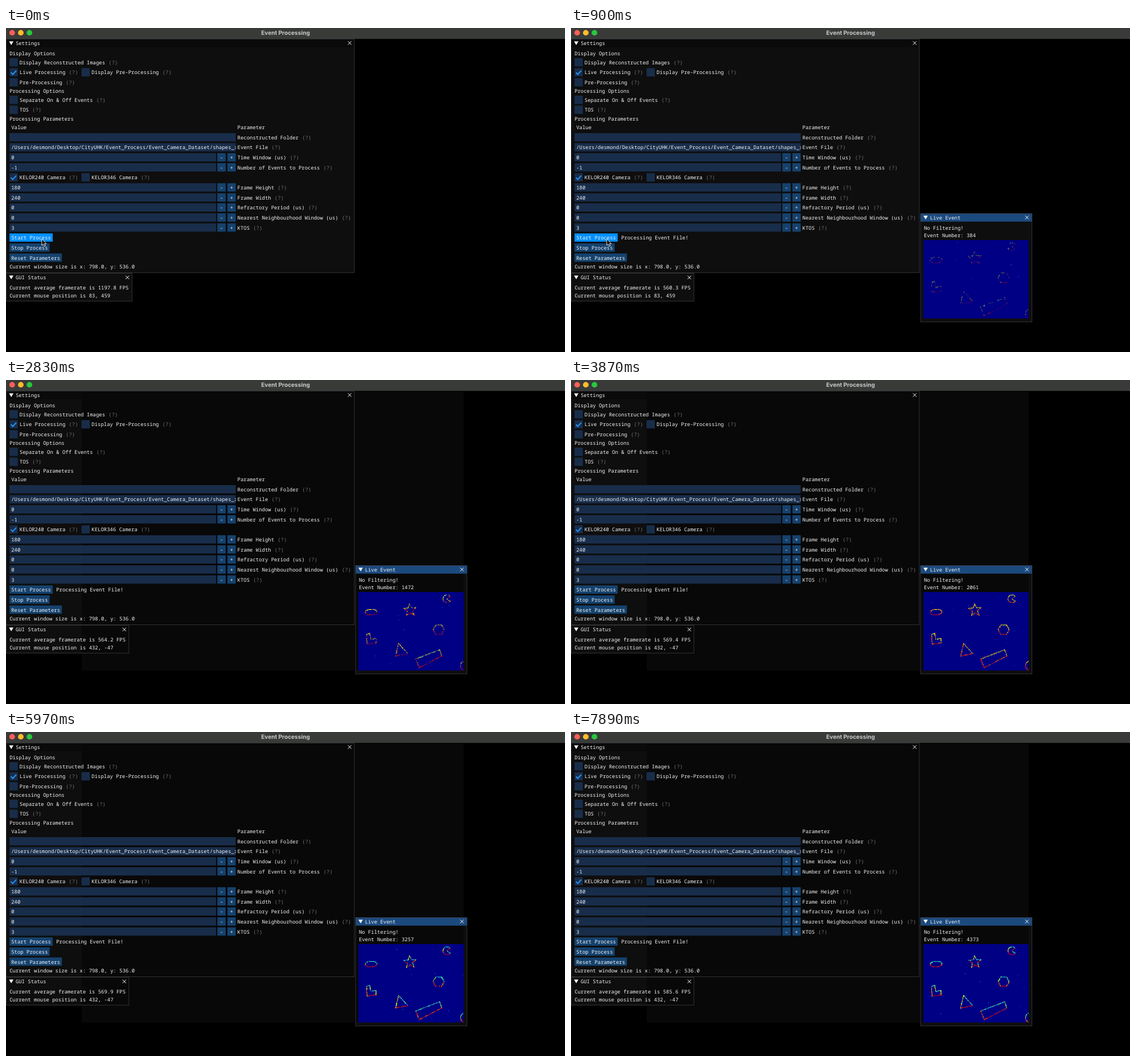
An HTML page with a canvas for the animation above (8000 ms loop, 982 px wide and 570 px high).

```html
<!DOCTYPE html>
<html lang="en">
<head>
<meta charset="utf-8">
<title>Event Processing</title>
<style>
  html, body { margin: 0; width: 100%; height: 100%; overflow: hidden; background: #000; }
  #stage { position: absolute; left: 0; top: 0; width: 982px; height: 570px; overflow: hidden; }
  svg { position: absolute; left: 0; top: 0; }
  text { white-space: pre; text-rendering: geometricPrecision; }
  #ui text { font: 11.667px "Noto Sans Mono", "DejaVu Sans Mono", monospace; fill: #f4f4f4; }
  #ui .dim { fill: #757575; }
  .caption { font: 700 10.1px Inter, sans-serif; fill: #c9cac9; text-anchor: middle; }
  .win { fill: #0e0e0e; }
  .edge { fill: none; stroke: #3e3e44; }
  .field { fill: #182d4a; }
  .btn { fill: #15426e; }
  .hot { fill: #0290ff; }
  .tick { fill: none; stroke: #1f97ff; stroke-width: 2.6; }
  .cross { stroke: #fff; stroke-width: 1.3; }
  canvas { position: absolute; left: 619.2px; top: 372.9px; width: 184.8px; height: 138.6px; }
</style>
</head>
<body>
<div id="stage">
  <svg id="scene" width="982" height="570" viewBox="0 0 982 570"></svg>
  <canvas id="view" width="240" height="180"></canvas>
  <svg width="982" height="570" viewBox="0 0 982 570">
    <path id="pointer" d="M0 0V11.2L2.6 8.8L4.5 12.8L6.3 12L4.5 8.1H8Z" fill="#000" stroke="#fff" stroke-width=".9"/>
  </svg>
</div>
<script>
const LOOP = 8000, SCALE = 0.76719, BAR = 25;
const $ = id => document.getElementById(id);

// ---- Interface, laid out in unscaled window pixels ----
const rect = (x, y, w, h, cls, id = '') =>
  `<rect x="${x}" y="${y}" width="${w}" height="${h}" class="${cls}" id="${id}"/>`;
const label = (x, mid, str, cls = '', id = '') =>
  `<text x="${x}" y="${mid + 4.7}" class="${cls}" id="${id}">${str.replace(/&/g, '&amp;')}</text>`;
const helped = (x, mid, str) =>
  label(x, mid, str) + label(x + str.length * 7 + 8, mid, '(?)', 'dim');
const button = (mid, str, id) =>
  rect(8, mid - 9.5, str.length * 7 + 8, 19, 'btn', id) + label(12, mid, str);
const checkbox = (x, mid, str, on, id) =>
  rect(x, mid - 9.5, 19, 19, 'field', id) +
  (on ? `<path class="tick" d="M${x + 3.5} ${mid + .5}l4 4.5l8-9"/>` : '') +
  helped(x + 23, mid, str);
const cross = (x, y) =>
  `<path class="cross" d="M${x - 4} ${y - 4}l8 8m0-8l-8 8"/>`;
const heading = (x, y, str) =>
  `<path d="M${x + 7} ${y + 5.5}h10l-5 8.5z" fill="#fff"/>` + label(x + 22, y + 10, str);
const field = (mid, name, value, steps) =>
  rect(8, mid - 9.5, steps ? 473 : 518, 19, 'field') +
  `<g clip-path="url(#fieldClip)">${label(12, mid, value)}</g>` +
  (steps ? [[484, '-'], [507, '+']].map(([x, s]) =>
    rect(x, mid - 9.5, 19, 19, 'btn') + label(x + 6, mid, s)).join('') : '') +
  helped(530, mid, name);

const path = '/Users/desmond/Desktop/CityUHK/Event_Process/Event_Camera_Dataset/shapes_rotation';
const settings = [
  heading(0, 0, 'Settings'), cross(787, 9.5),
  label(8, 33.5, 'Display Options'),
  checkbox(8, 53.5, 'Display Reconstructed Images'),
  checkbox(8, 76.5, 'Live Processing', true),
  checkbox(173, 76.5, 'Display Pre-Processing'),
  checkbox(8, 99.5, 'Pre-Processing'),
  label(8, 119.5, 'Processing Options'),
  checkbox(8, 139.5, 'Separate On & Off Events'),
  checkbox(8, 162.5, 'TOS'),
  label(8, 182.5, 'Processing Parameters'),
  label(12, 202.5, 'Value'), label(530, 202.5, 'Parameter'),
  field(225.5, 'Reconstructed Folder', ''),
  field(248.5, 'Event File', path),
  field(271.5, 'Time Window (us)', '0', true),
  field(294.5, 'Number of Events to Process', '-1', true),
  checkbox(8, 317.5, 'KELOR240 Camera', true),
  checkbox(173, 317.5, 'KELOR346 Camera', false, 'altCamera'),
  field(340.5, 'Frame Height', '180', true),
  field(363.5, 'Frame Width', '240', true),
  field(386.5, 'Refractory Period (us)', '0', true),
  field(409.5, 'Nearest Neighbourhood Window (us)', '0', true),
  field(432.5, 'KTOS', '3', true),
  button(455.5, 'Start Process', 'start'),
  label(115, 455.5, 'Processing Event File!', '', 'busy'),
  button(478.5, 'Stop Process'),
  button(501.5, 'Reset Parameters'),
  label(8, 521.5, 'Current window size is x: 798.0, y: 536.0'),
  rect(.5, .5, 797, 535.5, 'edge')
].join('');

const status = heading(0, 537, 'GUI Status') +
  `<g id="statusClose">${cross(0, 547)}</g>` +
  label(8, 570.5, '', '', 'rate') + label(8, 587.5, '', '', 'mouse') +
  rect(.5, 537.5, 282, 64, 'edge', 'statusEdge');

const live = `<rect x="800" y="400" width="256" height="19" fill="#1c4a7e"/>` +
  heading(800, 400, 'Live Event') + cross(1044, 409.5) +
  label(808, 433.5, 'No Filtering!') + label(808, 450.5, '', '', 'count') +
  rect(800.5, 400.5, 255, 248.5, 'edge');

const lights = ['#ff5f57', '#febc2e', '#28c840'].map((c, i) =>
  `<circle cx="${10.8 + 15.2 * i}" cy="8.4" r="4.9" fill="${c}"/>`).join('');
const toWindow = `transform="scale(${SCALE}) translate(0 ${BAR})"`;

$('scene').innerHTML = `
  <clipPath id="fieldClip"><rect x="8" y="0" width="518" height="536"/></clipPath>
  <rect width="982" height="19.2" fill="#393b39"/>${lights}
  <text class="caption" x="491" y="11.9">Event Processing</text>
  <g ${toWindow}>
    ${rect(0, 0, 798, 536, 'win')}<rect width="798" height="19" fill="#0a0a0a"/>
    ${rect(0, 537, 289, 65, 'win', 'statusBack')}
    ${rect(800, 400, 256, 249, 'win', 'liveBack')}
  </g>
  <rect id="veil" x="133" y="19.2" width="671" height="491.8" fill="#080808"/>
  <g id="ui" ${toWindow}>${settings}${status}<g id="live">${live}</g></g>`;

// ---- Timing: 150 ms steps, a few of them 140 ms ----
const shortSteps = [11, 16, 20, 42, 48, 52];
const stepTimes = [0];
for (let i = 1; i < 54; i++) stepTimes.push(stepTimes[i - 1] + (shortSteps.includes(i) ? 140 : 150));

// Piecewise linear lookup in rows of [time, ...values].
function track(rows, t) {
  let i = 0;
  while (i < rows.length - 2 && t >= rows[i + 1][0]) i++;
  const a = rows[i], b = rows[i + 1];
  const k = Math.min(1, Math.max(0, (t - a[0]) / (b[0] - a[0])));
  return a.slice(1).map((v, j) => v + (b[j + 1] - v) * k);
}
const counts = [[300, 47], [1640, 799], [3870, 2061], [5070, 2738], [6860, 3770], [7890, 4373]];
const rates = [[0, 1197.8], [150, 1198.3], [300, 849.9], [450, 561.6], [1640, 558.2],
  [3870, 569.4], [5070, 564.4], [6860, 575.3], [7890, 585.6]];
// density, mean level, swing, direction of the swing
const looks = [[300, .025, .75, .15, 1], [900, .25, .74, .2, 1], [1640, .5, .76, .2, 1],
  [3870, .88, .74, .12, 1.9], [5070, .8, .64, .25, 2.4], [6860, .92, .68, .27, 1.2], [7890, .9, .67, .25, 1.7]];

// ---- Event view ----
const ctx = $('view').getContext('2d');
const polar = (cx, cy, rx, ry, n, from = 0, sweep = 2 * Math.PI, tilt = 0) =>
  Array.from({ length: n }, (_, i) => {
    const a = from + sweep * i / n, x = rx * Math.cos(a), y = ry * Math.sin(a);
    return [cx + x * Math.cos(tilt) - y * Math.sin(tilt), cy + x * Math.sin(tilt) + y * Math.cos(tilt)];
  });
const star = polar(117.5, 41.5, 15.5, 15.5, 10, -1.63)
  .map(([x, y], i) => i % 2 ? [117.5 + (x - 117.5) * .43, 41.5 + (y - 41.5) * .43] : [x, y]);
const shapes = [
  polar(29, 46, 14, 7, 24, 0, 2 * Math.PI, -.05),
  star,
  [...polar(202, 15.5, 9.5, 9.5, 18, .62, 5.3), [202, 15.5]],
  polar(183, 86.5, 13, 13, 6, .05),
  [[18, 97], [26, 94.5], [28.5, 108.5], [40, 106], [41, 117], [19.5, 120]],
  [[91.5, 117.5], [113, 141.5], [84.5, 147.5]],
  [[130.5, 153.5], [185.5, 132], [190.5, 147], [138.5, 174]],
  polar(242, 169, 9.5, 11, 18)
];

function randomFrom(seed) {
  return () => {
    seed = seed + 0x6D2B79F5 | 0;
    let r = Math.imul(seed ^ seed >>> 15, 1 | seed);
    r = r + Math.imul(r ^ r >>> 7, 61 | r) ^ r;
    return ((r ^ r >>> 14) >>> 0) / 4294967296;
  };
}
function jet(v) {
  const part = c => Math.round(255 * Math.min(1, Math.max(0, 1.5 - Math.abs(4 * v - c))));
  return `rgb(${part(3)},${part(2)},${part(1)})`;
}
function drawEvents(step, t) {
  const random = randomFrom(step * 977 + 5);
  const [density, mean, swing, dir] = track(looks, t);
  const dot = (x, y, v) => {
    ctx.fillStyle = jet(Math.min(.91, Math.max(.25, v)));
    ctx.fillRect(Math.floor(x), Math.floor(y), 1, 1);
  };
  ctx.fillStyle = '#000084';
  ctx.fillRect(0, 0, 240, 180);
  shapes.forEach((points, s) => points.forEach(([x, y], i) => {
    const [x2, y2] = points[(i + 1) % points.length];
    const dx = x2 - x, dy = y2 - y, len = Math.hypot(dx, dy);
    const facing = Math.atan2(-dx, dy);
    const base = mean + swing * Math.cos(facing - dir);
    for (let d = 0; d < len; d += .9) {
      if (random() > density) continue;
      const level = base + .05 * Math.sin(d * .4 + s * 2 + step) + (random() - .5) * .12;
      const px = x + dx * d / len, py = y + dy * d / len;
      dot(px, py, level);
      // Thicken the line on its inner side.
      if (random() < density * .55) dot(px - Math.cos(facing), py - Math.sin(facing), level - .03);
    }
  }));
  for (let i = 0; i < 3 + 7 * density; i++) dot(random() * 240, random() * 180, .25 + random() * .2);
}

// ---- Playback ----
const show = (id, on) => $(id).style.display = on ? '' : 'none';
function pointerAt(t) {
  if (t < 1050) return [83, 459];
  return t < 1200 ? [180, 319] : t < 1350 ? [412, -18] : [432, -47];
}
function render(step) {
  const t = stepTimes[step], running = t >= 300, away = t >= 1200;
  const [mx, my] = pointerAt(t);
  const rate = `Current average framerate is ${track(rates, t)[0].toFixed(1)} FPS`;
  const width = rate.length * 7 + 16;
  $('rate').textContent = rate;
  $('mouse').textContent = `Current mouse position is ${mx}, ${my}`;
  $('statusBack').setAttribute('width', width);
  $('statusEdge').setAttribute('width', width - 1);
  $('statusClose').setAttribute('transform', `translate(${width - 11} 0)`);
  $('start').setAttribute('class', t < 1050 ? 'hot' : 'btn');
  $('altCamera').setAttribute('class', t >= 1050 && !away ? 'btn' : 'field');
  $('pointer').setAttribute('transform', `translate(${mx * SCALE - .8} ${(my + BAR) * SCALE})`);
  ['busy', 'live', 'liveBack', 'view'].forEach(id => show(id, running));
  show('veil', away);
  if (running) {
    $('count').textContent = `Event Number: ${Math.round(track(counts, t)[0])}`;
    drawEvents(step, t);
  }
}
let shown = -1;
const begin = performance.now();
function tick() {
  const t = Math.max(0, performance.now() - begin) % LOOP;
  let step = stepTimes.length - 1;
  while (stepTimes[step] > t) step--;
  if (step !== shown) render(shown = step);
  requestAnimationFrame(tick);
}
tick();
</script>
</body>
</html>
```
